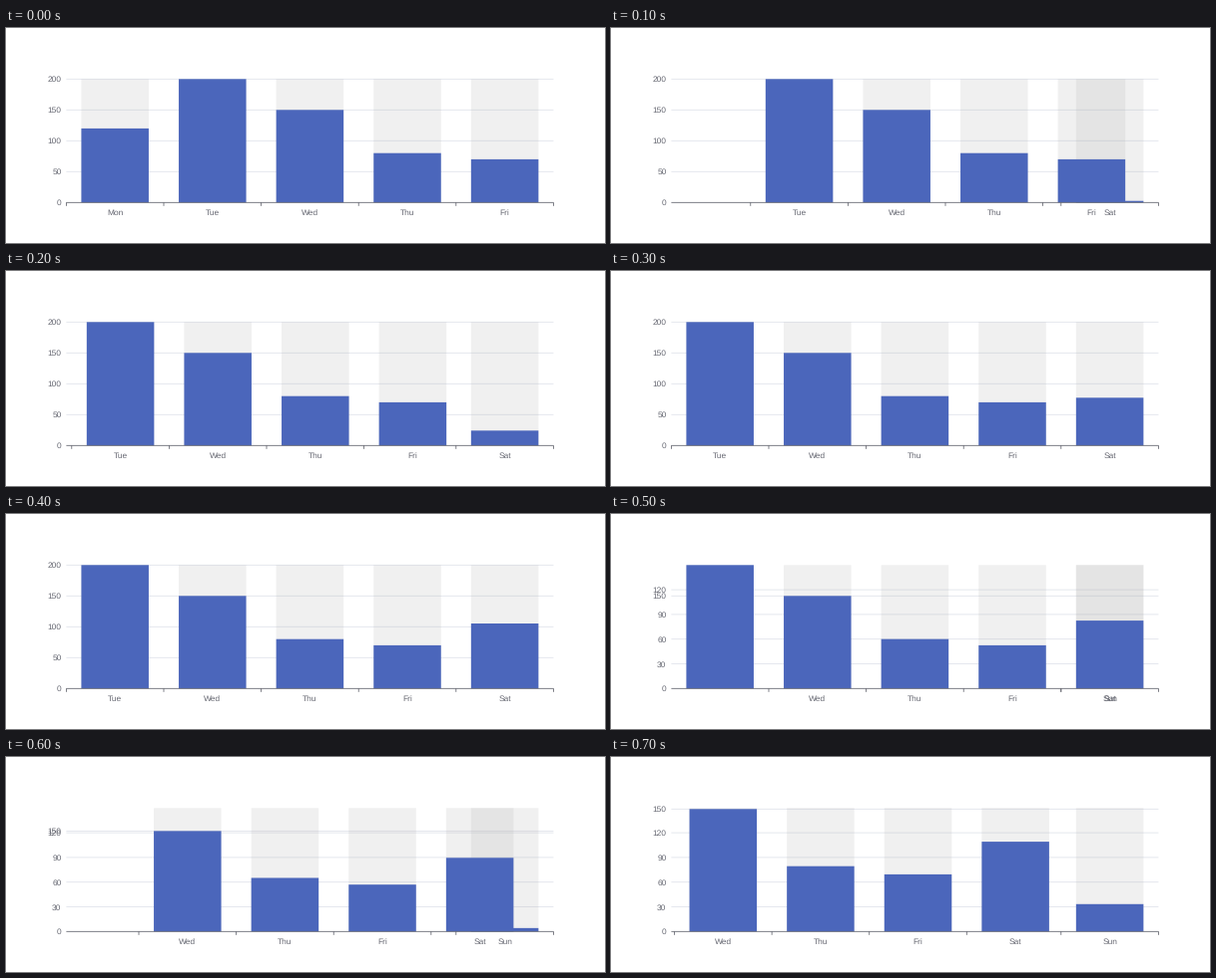
Write a matplotlib script that moves like this. It is 600x216 px and loops after 800 ms.

```python
import matplotlib.pyplot as plt
from matplotlib.animation import FuncAnimation
from matplotlib.patches import Rectangle

W, H, DPI = 600, 216, 100
LEFT, RIGHT, BASE, PLOT_H = 60.4, 548.4, 175.3, 124.0
BAND = (RIGHT - LEFT) / 5
BAR_W = 67.5
BAR, TRACK, GRID = "#4b66bb", "#b4b4b4", "#dfe2ea"
AXIS, TEXT = "#5c5e68", "#666872"
STEP_MS, FRAMES = 100, 8
SLIDE_MS, GROW_MS = 250, 500
FIRST_START, SECOND_START = 10, 500

DAYS = ["Mon", "Tue", "Wed", "Thu", "Fri", "Sat", "Sun"]
VALUES = [120, 200, 150, 80, 70, 110, 130]

plt.rcParams.update({"font.family": "Liberation Sans", "text.hinting": "none"})
fig = plt.figure(figsize=(W / DPI, H / DPI), dpi=DPI, facecolor="white")
ax = fig.add_axes([0, 0, 1, 1])


def ease(x):
    """Cubic in-out."""
    x = min(max(x, 0), 1)
    return 4 * x**3 if x < 0.5 else 1 - 4 * (1 - x) ** 3


def line(xs, ys, color, z):
    ax.plot(xs, ys, color=color, lw=0.72 * 0.8, zorder=z,
            solid_capstyle="butt", snap=False)


def rect(x, height, color, alpha, z):
    ax.add_patch(Rectangle((x, BASE - height), BAR_W, height, fc=color,
                           alpha=alpha, lw=0, zorder=z, snap=False))


def label(x, baseline, text, align):
    ax.text(x, baseline, text, ha=align, va="baseline", color=TEXT,
            fontsize=8.4 * 0.72, zorder=5)


def grid_line(value, height):
    y = BASE - height
    if value:
        line([LEFT, RIGHT], [y, y], GRID, 1)
    label(55.5, y + 3, str(value), "right")


def bar(slot, height):
    x = LEFT + slot * BAND + (BAND - BAR_W) / 2
    rect(x, PLOT_H, TRACK, 0.2, 2)
    rect(x, height, BAR, 1, 3)


def category(slot, name):
    x = LEFT + slot * BAND
    tick(x)
    label(x + BAND / 2, BASE + 12.2, name, "center")


def tick(x):
    line([x, x], [BASE, BASE + 3.5], AXIS, 4)


def draw(frame):
    ax.clear()
    ax.set(xlim=(0, W), ylim=(H, 0))
    ax.axis("off")
    t = frame * STEP_MS
    second = t >= SECOND_START
    start = SECOND_START if second else FIRST_START
    slide = ease((t - start) / SLIDE_MS)
    first = 1 if second else 0

    if second:
        for value in range(0, 121, 30):
            grid_line(value, value / 150 * PLOT_H)
        grid_line(150, (0.75 + 0.25 * slide) * PLOT_H)
        unit = PLOT_H / 200 + slide * (PLOT_H / 150 - PLOT_H / 200)
    else:
        for value in range(0, 201, 50):
            grid_line(value, value / 200 * PLOT_H)
        unit = PLOT_H / 200

    # The outgoing bar vanishes as soon as the slide begins.
    moving = t > start
    for i in range(first + (1 if moving else 0), first + 5):
        height = VALUES[i] * unit
        if i == 5 and not second:
            continue
        bar(i - first - slide, height)
        if second and i == first and not moving:
            continue
        category(i - first - slide, DAYS[i])

    if t >= start:
        new = first + 5
        final_unit = PLOT_H / (150 if second else 200)
        bar(4, VALUES[new] * final_unit * ease((t - start) / GROW_MS))
        category(4, DAYS[new])

    line([LEFT, RIGHT], [BASE, BASE], AXIS, 4)
    tick(RIGHT)
    return ax.get_children()


anim = FuncAnimation(fig, draw, frames=FRAMES, init_func=lambda: [],
                     interval=STEP_MS, repeat=True, repeat_delay=0)
plt.show()
```
